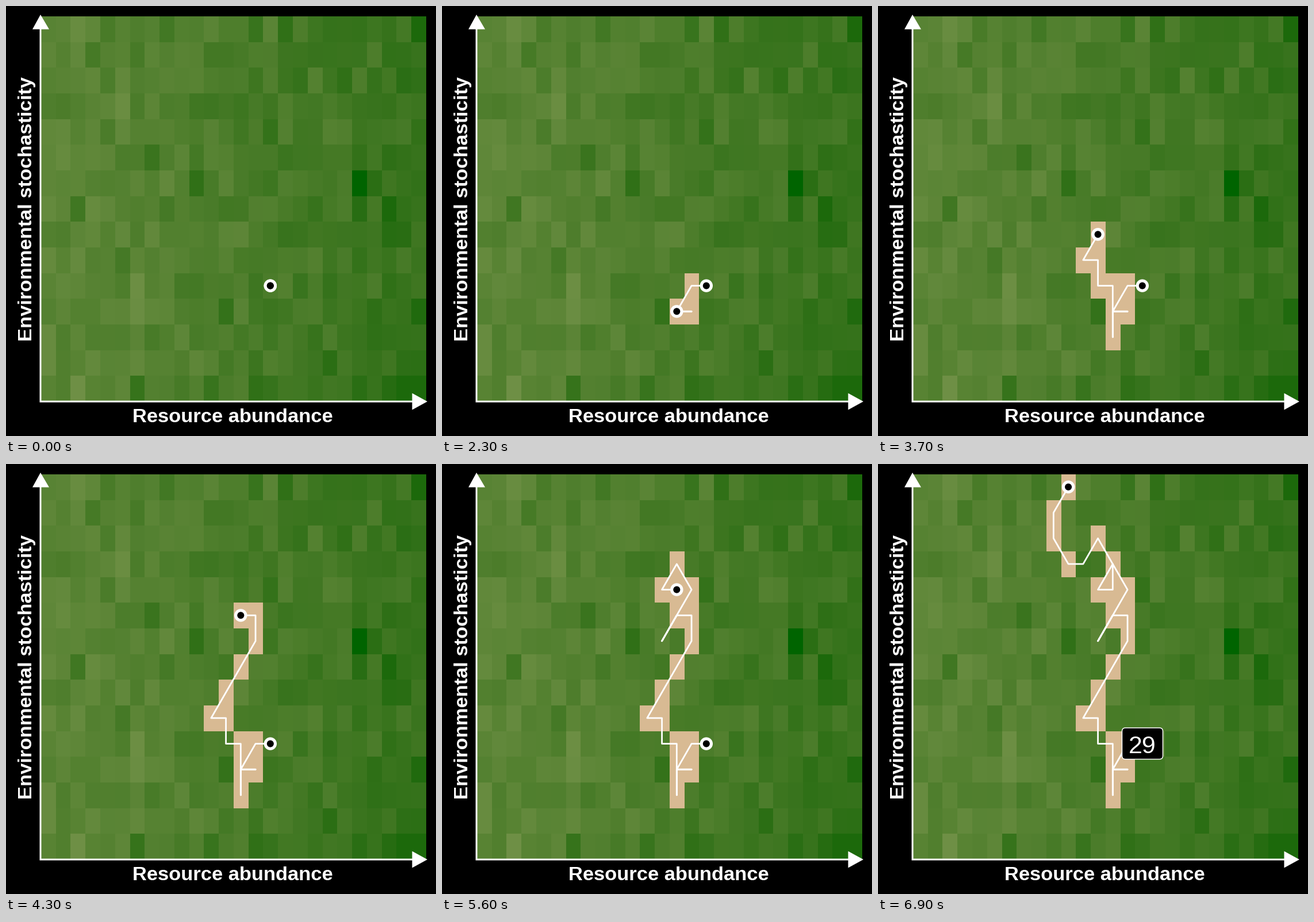
Animation, 748 px wide and 748 px high, one loop 10000 ms. Source, as a matplotlib script:

```python
import numpy as np
import matplotlib.pyplot as plt
from matplotlib.animation import FuncAnimation
from matplotlib.patches import Circle, FancyBboxPatch, Polygon

SIZE, DPI = 748, 100
FRAMES, INTERVAL = 100, 100
START, TICKS = 15, 54  # still frames before the walk, frames it takes
COLS, ROWS = 26, 15
LEFT, RIGHT, TOP, BOTTOM = 61.2, 730.5, 17.8, 687.8
CELL_W, CELL_H = (RIGHT - LEFT) / COLS, (BOTTOM - TOP) / ROWS
EATEN = np.array([216, 186, 147]) / 255
RICHEST = (21, 6)
PT = 72 / DPI

# Turning points of the walk, as (column, row)
TURNS = [(15, 10), (14, 10), (13, 11), (14, 11), (13, 11), (13, 12), (13, 10),
         (12, 10), (12, 9), (11, 9), (14, 6), (14, 5), (13, 5), (12, 6),
         (14, 4), (13, 3), (12, 4), (13, 4), (13, 3), (12, 2), (11, 3),
         (10, 3), (9, 2), (9, 1), (10, 0)]


def walk_cells():
    """Every cell on the way from turn to turn, one step at a time."""
    cells = [np.array(TURNS[0])]
    for turn in TURNS[1:]:
        while tuple(cells[-1]) != turn:
            cells.append(cells[-1] + np.sign(turn - cells[-1]))
    return [tuple(cell) for cell in cells]


def centre(cell):
    col, row = cell
    return LEFT + (col + 0.5) * CELL_W - 0.4, TOP + (row + 0.5) * CELL_H - 0.2


def landscape():
    """Barren on the left, lush on the right, with patchy noise."""
    rng = np.random.default_rng(4)
    level = np.linspace(0.75, 0.3, COLS) + rng.normal(0, 0.1, (ROWS, COLS))
    level = level.clip(0.12, 1)
    level[RICHEST[::-1]] = 0
    return np.dstack([114 * level ** 0.66, 100 + 46 * level,
                      72 * level ** 0.85]) / 255


def is_eaten(i, step):
    """Every eighth cell grows back, at a fixed rhythm."""
    regrown = i % 8 == 0 and step >= 10 + 5 * i / 8
    return not regrown


fig = plt.figure(figsize=(SIZE / DPI, SIZE / DPI), dpi=DPI, facecolor="black")
ax = fig.add_axes([0, 0, 1, 1])
ax.axis("off")

walk = walk_cells()
green_field = landscape()
field = ax.imshow(green_field, extent=(LEFT, RIGHT, BOTTOM, TOP),
                  interpolation="nearest", aspect="auto")
ax.set_xlim(0, SIZE)
ax.set_ylim(SIZE, 0)

# Axis arrows and titles
ax.plot([60, 60, 710], [35, 688, 688], color="white", lw=3 * PT,
        solid_joinstyle="miter", snap=False)
for tip in ([(60, 15), (46, 40.5), (75, 40.5)],
            [(733, 688), (706.5, 673.5), (706.5, 702.5)]):
    ax.add_patch(Polygon(tip, fc="white", lw=0, zorder=3))

title = dict(color="white", family="Liberation Sans", weight="bold",
             size=34.45 * PT, ha="center", va="baseline", rotation_mode="anchor")
ax.text(394.7, 724, "Resource abundance", **title)
ax.text(45, 352.7, "Environmental stochasticity", rotation=90, **title)

trail, = ax.plot([], [], color="white", lw=2.8 * PT, zorder=4, snap=False,
                 solid_capstyle="butt", solid_joinstyle="round")


def marker(xy):
    rings = [Circle(xy, 11.2, fc="white", lw=0, zorder=5),
             Circle(xy, 6, fc="black", lw=0, zorder=6)]
    for ring in rings:
        ax.add_patch(ring)
    return rings


marker(centre(walk[0]))
walker = marker(centre(walk[0]))

label = FancyBboxPatch((424.5, 459), 71, 54.5, fc="black", ec="white", lw=1.5 * PT,
                       boxstyle="round,pad=0,rounding_size=6", zorder=7)
ax.add_patch(label)
count = ax.text(460, 502.5, str(len(walk)), color="white", size=43 * PT,
                family="Liberation Sans", ha="center", va="baseline", zorder=8)


def draw(frame):
    progress = np.clip((frame - START) / TICKS, 0, 1)
    step = round(progress * (len(walk) - 1))

    colours = green_field.copy()
    for i in range(1, step + 1):
        if is_eaten(i, step):
            col, row = walk[i]
            colours[row, col] = EATEN
    field.set_data(colours)

    points = [centre(cell) for cell in walk[:step + 1]]
    trail.set_data(*zip(*points))
    for ring in walker:
        ring.center = points[-1]

    done = progress == 1
    label.set_visible(done)
    count.set_visible(done)
    return [field, trail, *walker, label, count]


anim = FuncAnimation(fig, draw, frames=FRAMES, interval=INTERVAL,
                     repeat=True, repeat_delay=0, blit=False)
plt.show()
```
